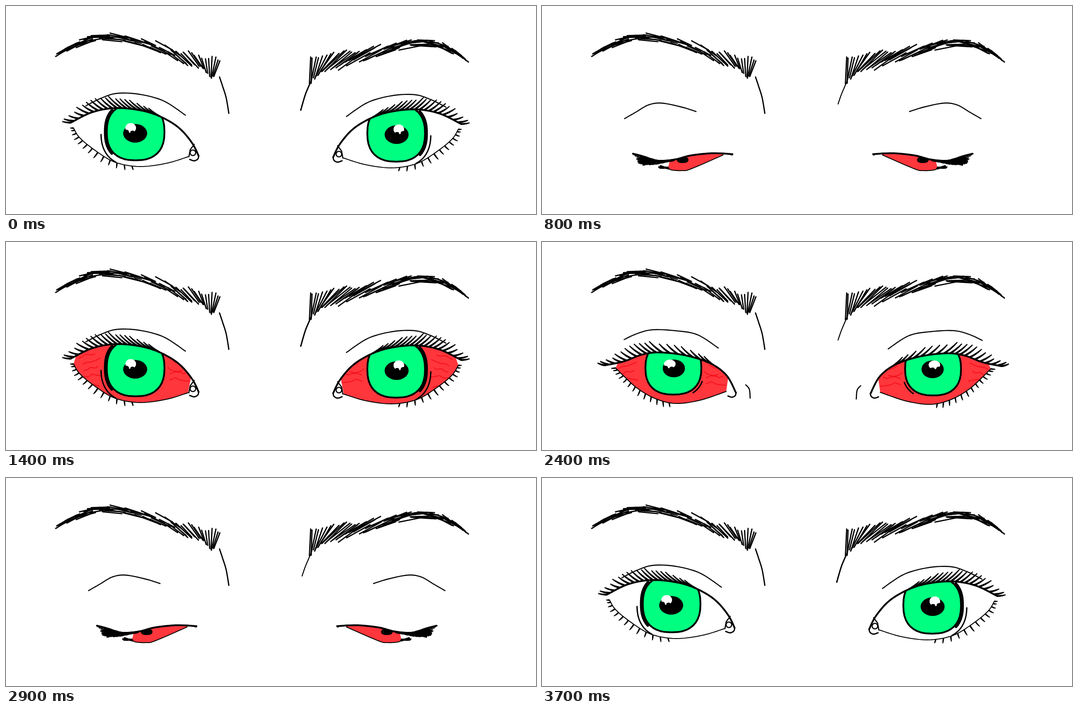
An HTML page with a canvas that plays this animation: 1194x469 px, repeating every 3800 ms.

```html
<!DOCTYPE html>
<html>
<head>
<meta charset="utf-8">
<style>
html, body { margin: 0; width: 100%; height: 100%; overflow: hidden; background: #fff }
canvas { display: block }
</style>
</head>
<body>
<canvas id="stage" width="1194" height="469"></canvas>
<script>
const g = document.getElementById('stage').getContext('2d');
const RED = '#ff363c', GREEN = '#00ff80', VEIN = '#f4101c';

// Key poses of the left eye, from wide open to closed.
// lash and under hold the reach along the lid and the hair offsets from outer to inner corner.
const poses = [
  {
    axis: 1171, dy: 3, hook: 1,
    lid: [[146, 263], [190, 241], [235, 231], [282, 232], [335, 244], [385, 271], [418, 307], [434, 338]],
    low: [[152, 275], [166, 297], [200, 325], [245, 352], [300, 362], [360, 355], [410, 340]],
    crease: [[180, 225], [214, 208], [250, 197], [300, 199], [355, 214], [404, 246]],
    iris: [292, 284, 65, 64], pupil: [291, 287, 27, 21], shine: [281, 275, 12, 11],
    lash: { reach: .6, offsets: [[-23, -3], [-29, -25], [-27, -20]] },
    under: { reach: .62, offsets: [[-9, 0], [-11, 12], [3, 10]] }
  },
  {
    axis: 1177, dy: 2, hook: .9,
    lid: [[142, 278], [185, 269], [225, 254], [265, 249], [325, 256], [380, 274], [416, 301], [437, 340]],
    low: [[166, 284], [185, 303], [215, 330], [255, 353], [300, 364], [355, 357], [415, 337]],
    crease: [[185, 220], [213, 207], [248, 198], [300, 200], [350, 209], [397, 239]],
    iris: [296, 284, 63, 60], pupil: [297, 285, 25, 20], shine: [288, 275, 13, 10],
    lash: { reach: .73, offsets: [[-20, -6], [-29, -23], [-22, -21]] },
    under: { reach: .62, offsets: [[-12, 1], [-7, 12], [2, 11]] }
  },
  {
    axis: 1172, dy: 0, hook: .35,
    lid: [[176, 317], [215, 309], [245, 302], [285, 300], [335, 300], [378, 310], [412, 322], [431, 337]],
    low: [[200, 316], [213, 333], [237, 350], [265, 362], [312, 367], [350, 359], [400, 339]],
    crease: [[173, 236], [212, 221], [255, 213], [300, 215], [345, 226], [383, 251]],
    iris: [292, 303, 58, 48], pupil: [293, 302, 19, 11], shine: [288, 296, 0, 0],
    lash: { reach: .78, offsets: [[-16, -13], [-22, -16], [-29, -14]] },
    under: { reach: .62, offsets: [[-14, 2], [-8, 9], [0, 10]] }
  },
  {
    axis: 1175, dy: 0, hook: .15,
    lid: [[205, 333], [228, 339], [246, 345], [266, 349], [300, 346], [335, 337], [385, 332], [429, 334]],
    low: [[284, 364], [289, 369], [303, 371], [318, 371], [328, 370], [358, 358], [408, 336]],
    crease: [[186, 254], [212, 239], [240, 223], [270, 219], [315, 228], [347, 238]],
    iris: [317, 347, 11, 5], pupil: [317, 347, 9, 4], shine: [317, 347, 0, 0],
    lash: { reach: .57, offsets: [[0, 2], [-26, 12], [-14, 5]] },
    under: { reach: .1, offsets: [[-24, 2], [-20, -6], [-12, -3]] }
  }
];

// Spine of each brow from the tail inwards: x, y, hair angle, hair length, spread.
const brows = [
  [[125, 104, -28, 30, 3], [165, 86, -26, 40, 6], [205, 70, -5, 45, 8], [260, 74, 12, 46, 9],
   [320, 88, 22, 46, 10], [380, 107, 35, 48, 10], [430, 126, 56, 42, 6], [475, 143, 110, 44, 2]],
  [[1030, 117, 42, 28, 2], [1000, 98, 34, 40, 5], [960, 84, 10, 48, 7], [910, 87, -12, 52, 8],
   [850, 101, -22, 60, 8], [790, 115, -33, 68, 7], [735, 123, -46, 60, 4], [685, 146, -88, 54, 2]]
];

function randoms(seed) {
  return () => (seed = seed * 16807 % 2147483647) / 2147483647;
}

function mix(a, b, t) {
  if (typeof a === 'number') return a + (b - a) * t;
  const out = Array.isArray(a) ? [] : {};
  for (const key in a) out[key] = mix(a[key], b[key], t);
  return out;
}

function poseAt(level) {
  const i = Math.min(2, Math.floor(level));
  return mix(poses[i], poses[i + 1], level - i);
}

// Smooth interpolation through rows of any width, u from 0 to 1
function along(rows, u) {
  const last = rows.length - 1, i = Math.min(last - 1, Math.floor(u * last)), t = u * last - i;
  const [a, b, c, d] = [-1, 0, 1, 2].map(k => rows[Math.max(0, Math.min(last, i + k))]);
  return b.map((v, n) => v + t / 2 * (c[n] - a[n] +
    t * (2 * a[n] - 5 * v + 4 * c[n] - d[n] + t * (3 * (v - c[n]) + d[n] - a[n]))));
}

function curve(rows, count = 40) {
  return Array.from({ length: count + 1 }, (_, i) => along(rows, i / count));
}

// Arc of a slightly squared ellipse
function squircle([x, y, rx, ry], from = 0, to = 2 * Math.PI, scale = 1) {
  const bend = v => Math.sign(v) * Math.abs(v) ** .82;
  return Array.from({ length: 41 }, (_, i) => {
    const a = mix(from, to, i / 40);
    return [x + rx * scale * bend(Math.cos(a)), y + ry * scale * bend(Math.sin(a))];
  });
}

function trace(points) {
  g.beginPath();
  points.forEach(([x, y]) => g.lineTo(x, y));
}

function line(points, width, color = '#000') {
  trace(points);
  g.lineWidth = width;
  g.strokeStyle = color;
  g.stroke();
}

function fill(points, color) {
  trace(points);
  g.fillStyle = color;
  g.fill();
}

function oval([x, y, rx, ry], color) {
  g.beginPath();
  g.ellipse(x, y, rx, ry, 0, 0, 7);
  g.fillStyle = color;
  g.fill();
}

// Tapered hairs growing from a curve
function hairs(rows, { reach, offsets }, count, width, seed) {
  const rand = randoms(seed);
  for (let i = 0; i < count; i++) {
    const u = i / (count - 1), size = .85 + .3 * rand();
    const [x, y] = along(rows, u * reach);
    const [dx, dy] = along(offsets, u).map(v => v * size);
    const len = Math.hypot(dx, dy) || 1, nx = dy / len * width / 2, ny = -dx / len * width / 2;
    const mx = x + dx / 2, my = y + dy / 2 + len * .09;
    g.beginPath();
    g.moveTo(x + nx, y + ny);
    g.quadraticCurveTo(mx + nx, my + ny, x + dx + nx / 2, y + dy + ny / 2);
    g.lineTo(x + dx - nx / 2, y + dy - ny / 2);
    g.quadraticCurveTo(mx - nx, my - ny, x - nx, y - ny);
    g.fillStyle = '#000';
    g.fill();
  }
}

function drawBrow(spine, seed) {
  const rand = randoms(seed), count = 62;
  for (let i = 0; i < count; i++) {
    const [x, y, angle, length, spread] = along(spine, i / (count - 1));
    const a = (angle + 8 * (rand() - .5)) * Math.PI / 180;
    const half = length * (.38 + .2 * rand()), side = spread * (2 * rand() - 1);
    const dx = Math.cos(a) * half, dy = Math.sin(a) * half;
    line([[x - dx, y - dy + side], [x + dx, y + dy + side]], 2.8);
  }
}

// Short jagged walks on both sides of the iris
function drawVeins(shift) {
  const rand = randoms(77);
  for (let i = 0; i < 9; i++) {
    let x = i % 2 ? 358 + 20 * rand() : 165 + 15 * rand(), y = 262 + 7 * i + shift;
    const walk = [[x, y]];
    for (let k = 0; k < 4; k++) walk.push([x += 6 + 7 * rand(), y += 11 * (rand() - .5)]);
    line(walk, 2, VEIN);
  }
}

function drawIris(p, lid, shift) {
  g.save();
  trace([...lid, [434, 469], [146, 469]]);
  g.clip();
  const rim = squircle(p.iris);
  fill(rim, GREEN);
  oval(p.pupil, '#000');
  const [x, y, rx, ry] = p.shine;
  if (rx > 1) {
    oval([x + shift, y, rx, ry], '#fff');
    oval([x + shift - 10, y + 9, 6, 5], '#000');
    oval([x + shift + 4, y + 10, 5, 4], '#000');
  }
  line(rim, 4);
  g.restore();
}

function drawEye(p, level, red, mirrored) {
  const lid = curve(p.lid), low = curve(p.low);
  const start = low[0], end = low[low.length - 1];
  g.save();
  if (mirrored) g.transform(-1, 0, 0, 1, p.axis, p.dy);
  if (red) {
    g.save();
    fill([start, ...lid.filter(([x]) => x > start[0] + 4 && x < end[0] + 7), ...low.reverse()], RED);
    g.clip();
    if (level < 2) drawVeins(level * 9);
    g.restore();
  }
  drawIris(p, lid, mirrored ? 5 : 0);

  if (level === 0) {
    line(squircle(p.iris, 2.4, 3.9, 1.06), 5);
    line(squircle(p.iris, 2.1, 3.1, 1.2), 3);
    line([[424, 312], [415, 324], [412, 340]], 2.5);
    oval([421, 331, 7.5, 7.5], '#000');
    oval([421, 331, 5, 5], '#fff');
  } else if (level === 1) {
    line(squircle(p.iris, .4, .95, 1.1), 3);
    line(curve([[459, 322], [467, 332], [469, 352]]), 2.5);
  }

  const [x, y] = lid[lid.length - 1], h = p.hook;
  line(lid, 4);
  line(curve([[x, y], [x - 2 * h, y + 7 * h], [x - 10 * h, y + 11 * h], [x - 20 * h, y + 8 * h]]), 3);
  line(curve(p.crease), 2.4);
  line(low, 2);
  hairs(p.lid, p.lash, 19, 4.4, 11);
  hairs(p.low, p.under, 13, 3.4, 23);
  g.restore();
}

function drawNose(open) {
  line(curve([[481, 160], [488, 181], [496, 207], [502, 242]]), 2.8);
  line(curve([[688, 168], [675, 198], open ? [664, 235] : [667, 221]]), open ? 3 : 2.2);
}

const levels = [0, 1, 1.33, 1.67, 2, 2.5, 3, 3.1];

function draw(now) {
  const t = now % 3800, first = t < 2400;
  const step = Math.min(14, Math.floor((first ? t : t - 2300) / 100));
  const level = levels[7 - Math.abs(7 - step)];
  const red = first === step >= 7;
  const pose = poseAt(level);
  g.fillStyle = '#fff';
  g.fillRect(0, 0, 1194, 469);
  g.lineCap = g.lineJoin = 'round';
  brows.forEach((spine, i) => drawBrow(spine, 5 + i));
  drawNose(level === 0);
  drawEye(pose, level, red, false);
  drawEye(pose, level, red, true);
}

const begin = performance.now();
function tick() {
  draw(performance.now() - begin);
  requestAnimationFrame(tick);
}
tick();
</script>
</body>
</html>
```
